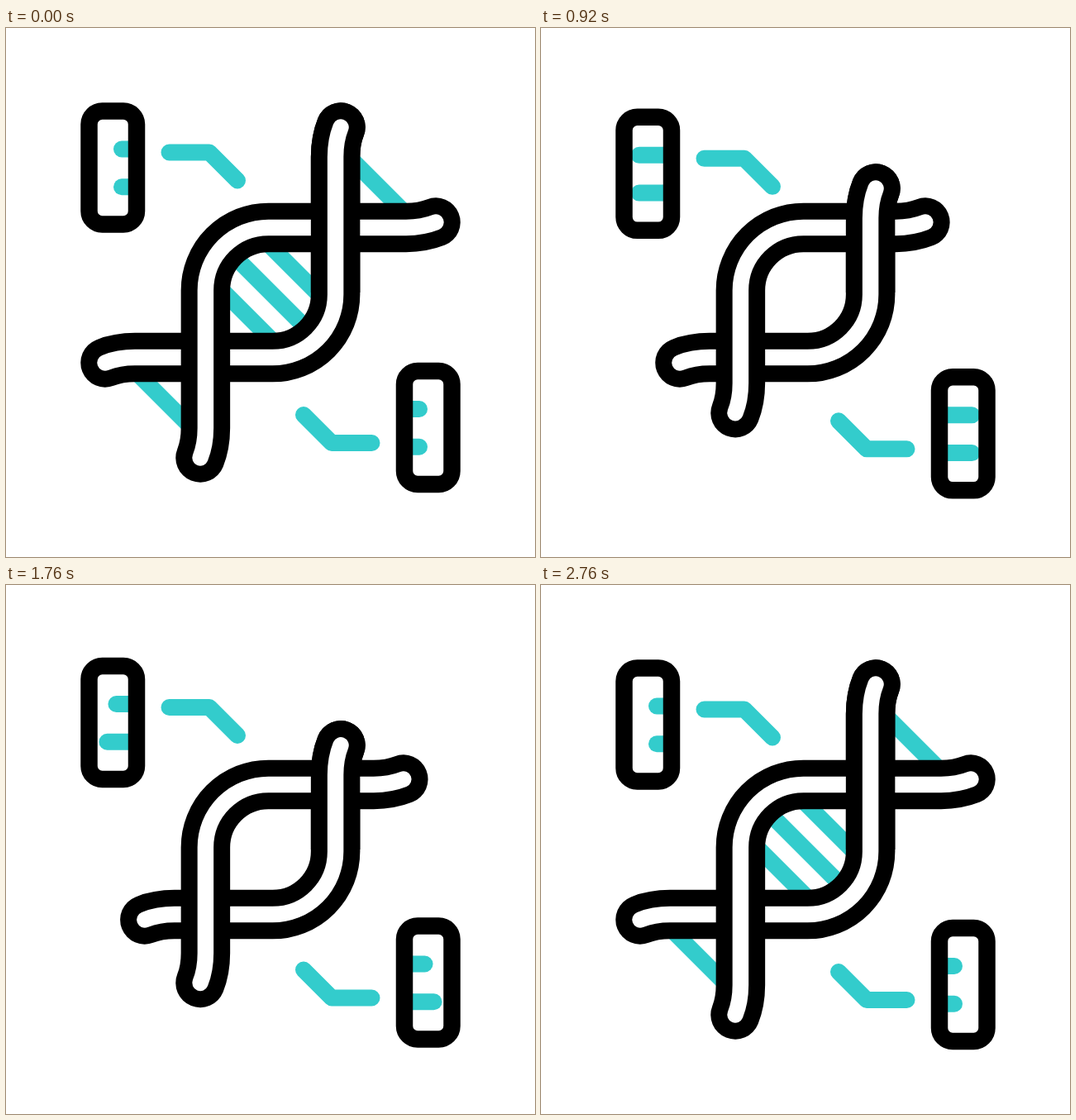
An HTML page with a canvas that plays this animation: 640 by 640 pixels, repeating every 3000 ms.

```html
<!DOCTYPE html>
<html lang="en">
<head>
<meta charset="utf-8">
<title>DNA strand</title>
<style>
html, body { margin: 0; height: 100%; overflow: hidden; background: #fff; }
canvas { display: block; width: 640px; height: 640px; }
</style>
</head>
<body>
<canvas id="stage" width="640" height="640"></canvas>
<script>
const ctx = document.getElementById('stage').getContext('2d');
const TEAL = '#33cccc', LOOP = 3000, STEP = 40;
const LOW = 241.4, HIGH = 398.6, BEND = 76;

const smooth = u => (1 - Math.cos(Math.PI * u)) / 2;
const soft = u => 0.35 * smooth(u) + 0.65 * u;
const span = (t, from, to) => Math.min(1, Math.max(0, (t - from) / (to - from)));

// Keys are [time, value, easing towards this key].
function track(t, keys) {
  let value = keys[0][1];
  for (let i = 1; i < keys.length; i++) {
    const [start, a] = keys[i - 1], [end, b, ease = smooth] = keys[i];
    if (t >= start) value = a + (b - a) * ease(span(t, start, end));
  }
  return value;
}

const BOB = [[240, 0], [760, 13, soft], [1400, -25.5], [2040, 13], [2760, 0, soft]];
const barKeys = (leave, back) => [[240, 140], [680, 102], [740, 102], [1130, 140],
  [1400, 102], [leave, 102], [back, 140], [2240, 102], [2400, 102], [2760, 140]];
const BARS = [barKeys(1440, 1880), barKeys(1540, 1960)];

// Start points of the rungs, and their diagonal reach.
const RUNGS = [[399, 140, 101], [297, 241, 102], [264, 264, 112], [241, 297, 102], [140, 399, 101]];

function stroke(path, width, color) {
  ctx.lineWidth = width;
  ctx.strokeStyle = color;
  ctx.stroke(path);
}

function line(...points) {
  const path = new Path2D();
  points.forEach(([x, y]) => path.lineTo(x, y));
  stroke(path, 20, TEAL);
}

// One strand from a vertical end, round a bend, to a horizontal end.
// side is -1 when the vertical end points up, 1 when it points down.
function strand(axis, side, tipY, tipX) {
  const tip = axis - side * 6.4, path = new Path2D();
  path.moveTo(tip, tipY);
  path.bezierCurveTo(tip + side * 4, tipY - side * 10, axis, tipY - side * 22, axis, tipY - side * 36);
  path.arcTo(axis, axis, axis + side * BEND, axis, BEND);
  path.lineTo(tipX - side * 36, axis);
  path.bezierCurveTo(tipX - side * 22, axis, tipX - side * 10, tip + side * 4, tipX, tip);
  return path;
}

function tube(path) {
  stroke(path, 59.5, '#000');
  stroke(path, 19.5, '#fff');
}

function drawRungs(t) {
  const grown = t < 1000 ? 1 - smooth(span(t, 240, 640)) : smooth(span(t, 1960, 2460));
  if (!grown) return;
  for (const [x, y, reach] of RUNGS) {
    const cut = reach * (1 - grown);
    line([x + cut, y + cut], [x + reach, y + reach]);
  }
}

function drawStrands(t) {
  const shrink = smooth(span(t, 240, 1160));
  const first = shrink - smooth(span(t, 1550, 2350));
  const second = shrink - smooth(span(t, 1400, 2440) ** 0.78);
  const a = strand(HIGH, -1, 120 + 88 * first, 120 + 57 * first);
  const b = strand(LOW, 1, 520 - 64.5 * second, 520 - 65.5 * second);
  tube(a);
  tube(b);
  // The upper crossing passes back over the second strand.
  ctx.save();
  ctx.beginPath();
  ctx.rect(320, 0, 320, 320);
  ctx.clip();
  tube(a);
  ctx.restore();
}

function drawBox(t) {
  BARS.forEach((keys, i) => {
    const y = 146.5 + i * 45.7;
    line([track(t, keys), y], [150, y]);
  });
  const box = new Path2D();
  box.roundRect(100.5, 100.5, 57.5, 137, 16);
  stroke(box, 20.5, '#000');
}

function drawLabels(t) {
  ctx.save();
  ctx.translate(0, track(t, BOB));
  drawBox(t);
  line([197.5, 150.5], [246, 150.5], [280, 184.5]);
  line([442.5, 502], [394, 502], [360, 468]);
  ctx.translate(640, 314.5);
  ctx.scale(-1, 1);
  drawBox(t);
  ctx.restore();
}

function draw(now) {
  const t = Math.floor(now % LOOP / STEP) * STEP;
  ctx.fillStyle = '#fff';
  ctx.fillRect(0, 0, 640, 640);
  ctx.lineCap = ctx.lineJoin = 'round';
  drawRungs(t);
  drawStrands(t);
  drawLabels(t);
}

const begin = performance.now();
function tick() {
  draw(performance.now() - begin);
  requestAnimationFrame(tick);
}
tick();
</script>
</body>
</html>
```
